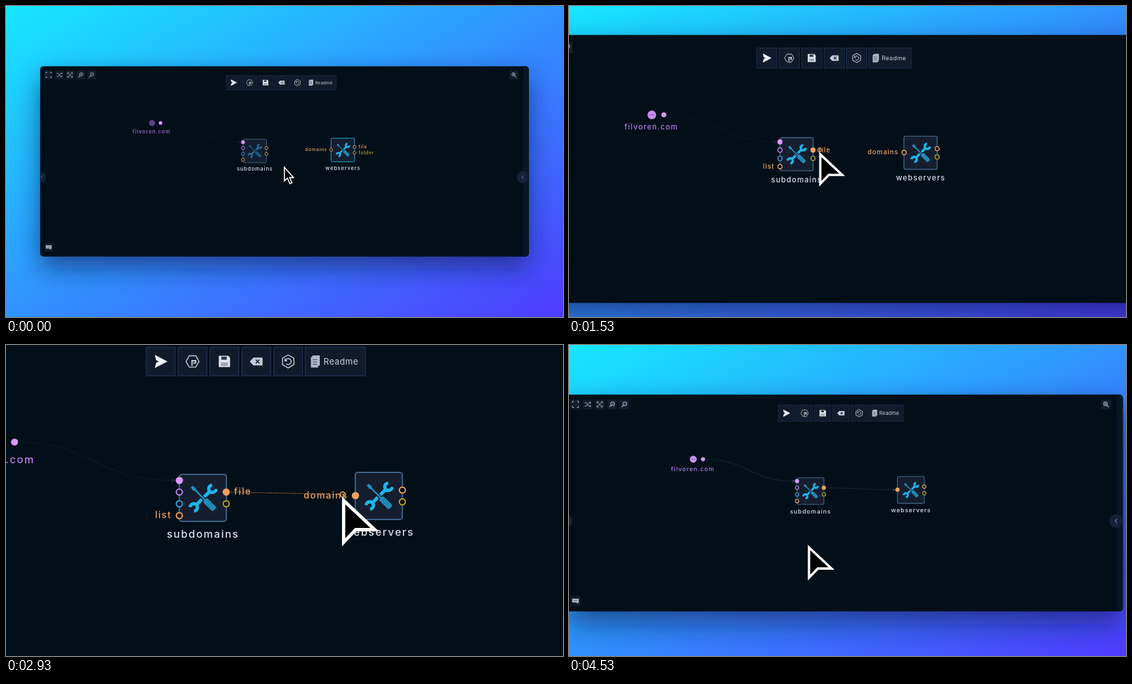
Recreate the animation shown at these times as an HTML page. Size 852 px wide and 476 px high, loop 4.59 s.

```html
<!DOCTYPE html>
<html lang="en">
<head>
<meta charset="utf-8">
<title>Workflow editor</title>
<style>
html, body { margin: 0; width: 100%; height: 100%; overflow: hidden; background: #3090ff; }
svg { display: block; width: 100%; height: 100%; }
text { font-family: Inter, "Open Sans", sans-serif; font-weight: 500; }
.name { font-size: 8px; letter-spacing: .88px; text-anchor: middle; }
.tag { font-size: 7.1px; letter-spacing: .7px; }
</style>
</head>
<body>
<svg id="stage" viewBox="0 0 852 476" preserveAspectRatio="none"></svg>
<script>
const LOOP = 4590, STEP = 1000 / 15;
const PURPLE = '#bd86f2', BLUE = '#3aa4ee', ORANGE = '#eea25f', YELLOW = '#b9a526';
const INK = '#c9d3df', PANEL = '#030f18';

const rect = (x, y, w, h, extra = '') => `<rect x="${x}" y="${y}" width="${w}" height="${h}" ${extra}/>`;
const disc = (x, y, r, extra = '') => `<circle cx="${x}" cy="${y}" r="${r}" ${extra}/>`;
const path = (d, extra = '') => `<path d="${d}" ${extra}/>`;
const line = (d, w = .8, color = INK) => path(d, `fill="none" stroke="${color}" stroke-width="${w}"`);
const at = (x, y, body, extra = '') => `<g transform="translate(${x} ${y})" ${extra}>${body}</g>`;
const group = (id, body) => `<g id="${id}">${body}</g>`;

const port = (x, y, color, id = '') =>
  disc(x, y, 2.3, `${id && `id="${id}"`} fill="${PANEL}" stroke="${color}" stroke-width="1"`);
const tagLeft = (x, y, s, color) =>
  `<text class="tag" x="${x - 5.9}" y="${y + 2.2}" text-anchor="end" fill="${color}">${s}</text>`;
const tagRight = (x, y, s, color) =>
  `<text class="tag" x="${x + 6}" y="${y + 2.2}" fill="${color}">${s}</text>`;
const name = (x, y, s, extra = 'fill="#d9e2ec"') => `<text class="name" x="${x + .4}" y="${y}" ${extra}>${s}</text>`;

// Wrench from lower left to upper right, screwdriver across it
function tools(x, y) {
  const head = path('M11.9 -2.1A2.8 2.8 0 1 0 11.9 2.1', 'fill="none" stroke="#1fb4ec" stroke-width="2.6"');
  const wrench = rect(-7.5, -1.3, 15, 2.6, 'fill="#1fb4ec"') + head + `<g transform="rotate(180)">${head}</g>`;
  const driver = 'M-12.4 -.9L-9.2 -1.4L-8.2 -.6H2V-1.7L3 -2.2H11Q12.4 -2.2 12.4 -1V1Q12.4 2.2 11 2.2H3L2 1.7V.6H-8.2L-9.2 1.4L-12.4 .9Z';
  return at(x, y, `<g transform="rotate(-45)">${wrench}</g><g transform="rotate(45)">` +
    path(driver, 'fill="#2191bd" stroke="#141e2e" stroke-width="1.6" paint-order="stroke"') +
    line('M4.5 -.8H11M4.5 .9H11', .4, '#15607f') + '</g>');
}

function node(id, x, y) {
  return rect(x, y, 36, 36, `id="${id}Box" rx="2" fill="#141e2e" stroke-width="1"`) +
    group(id + 'Icon', tools(x + 18.2, y + 18.1));
}

const curve = (x1, y1, x2, y2) => {
  const m = (x1 + x2) / 2;
  return `M${x1} ${y1}C${m} ${y1} ${m} ${y2} ${x2} ${y2}`;
};
const wire = (x1, y1, x2, y2) => line(curve(x1, y1, x2 - 4, y2), .9, '#16243a') +
  path(`M${x2 - 6} ${y2 - 1.8}L${x2 - 2.4} ${y2}L${x2 - 6} ${y2 + 1.8}Z`, 'fill="#3a4a66"');

const hex = r => 'M' + [0, 1, 2, 3, 4, 5].map(i =>
  `${(r * Math.cos(i * Math.PI / 3)).toFixed(2)} ${(r * Math.sin(i * Math.PI / 3)).toFixed(2)}`).join('L') + 'Z';

function toolbar() {
  const icons = [
    path('M-4 -4.5L4.6 0L-4 4.5L-3.2 1.2L-.8 0L-3.2 -1.2Z', 'fill="#eef3f8" stroke="#eef3f8" stroke-width=".6"'),
    line(hex(5), .7) + line('M-.4 3.4V-.6H2.4V1.2H.6', 1),
    path('M-4.3 -4.3H2.8L4.3 -2.8V4.3H-4.3Z', 'fill="#e2e8f0"') +
      rect(-2.4, -3.7, 4.2, 2.4, 'fill="#2a374a"') + rect(-2.8, .6, 5.6, 2.9, 'fill="#9aa6b6"'),
    path('M-5 0L-2.2 -3H4.8V3H-2.2Z', 'fill="#c3ccd8"') + line('M-.4 -1.4L2.4 1.4M2.4 -1.4L-.4 1.4', .9, '#1b283a'),
    `<g transform="rotate(30)">${line(hex(5), .7)}</g>` + line('M-2.2 -.7A2.3 2.3 0 1 1 -1.4 1.9M-2.4 -2.2V-.5H-.8', .7)
  ];
  const skin = 'fill="#101b2b" stroke="#1d2d4d" stroke-width=".8"';
  return icons.map((ic, i) => {
    const x = 337.2 + 24.4 * i;
    return rect(x, 106.4, 22, 21.8, skin) + at(x + 11, 117.3, ic);
  }).join('') + rect(458.9, 106.4, 46, 21.8, skin) +
    at(466.6, 117.3, path('M-1.8 -4.6H3.4V3.2H2.2V4.6H-3.4V-3Z', 'fill="#aeb9c7"') +
      line('M-2 -1.4H1.4M-2 .4H1.4M-2 2.2H1.4', .5, '#35445a')) +
    `<text x="472.9" y="119.7" font-size="6.5" letter-spacing=".28" style="font-weight:400" fill="${INK}">Readme</text>`;
}

function smallButtons() {
  const lens = line('M-1 1L-3.4 3.6', 1.1) + disc(.8, -.9, 2.5, `fill="none" stroke="${INK}" stroke-width=".9"`);
  const icons = [
    [65.3, 105.5, line('M-4 -2V-4H-2M2 -4H4V-2M4 2V4H2M-2 4H-4V2', .9)],
    [81.7, 105.5, line('M-4 -2.3H-2L1.6 2.3H4M-4 2.3H-2L1.6 -2.3H4M2.7 -3.6L4 -2.3L2.7 -1M2.7 1L4 2.3L2.7 3.6', .8)],
    [97.9, 105.5, line('M-3 -3L3 3M3 -3L-3 3', .8) + line('M-3.6 -1.4V-3.6H-1.4M1.4 -3.6H3.6V-1.4M3.6 1.4V3.6H1.4M-1.4 3.6H-3.6V1.4', .8)],
    [114.3, 105.5, lens + line('M-.4 -.9H2M.8 -2.1V.3', .6)],
    [130.7, 105.5, lens + line('M-.4 -.9H2', .6)],
    [777, 105.5, `<g transform="scale(-1 1)">${lens}</g>` + disc(-.8, -.9, 1.2, `fill="${INK}"`)],
    [65.3, 369.3, path('M-4.4 -3H4.4V2H3.4V4L1 2H-4.4Z', 'fill="#d3dbe5"') + line('M-2.6 -.5H2.6', .8, '#4a586c')]
  ];
  return icons.map(([x, y, ic]) =>
    at(x, y, rect(-6.5, -6.5, 13, 13, 'fill="#121d2d"') + `<g opacity=".8">${ic}</g>`)).join('');
}

function sideTabs() {
  return rect(791, 92, 9, 292, 'fill="#071727"') +
    disc(52, 262, 9, 'fill="#14213a"') + line('M53 259.8L55.2 262L53 264.2', .8, '#5f6f88') +
    disc(790.5, 262, 9.2, 'fill="#14213a"') + line('M791.8 259.4L789.2 262L791.8 264.6', .9, '#8291a6');
}

function source() {
  return disc(223.3, 179.1, 4.7, 'id="srcDisc"') +
    group('srcDots', [-2, 0, 2].map(d => disc(223.3 + d, 179.1, .6, 'fill="#6d3f98"')).join('')) +
    disc(236.4, 179, 2.7, 'fill="#d898fb"') + name(222.3, 195.1, 'filvoren.com', 'id="srcName"');
}

const arrow = 'M1.6 3.8L31.7 32H13.3L1.6 44.2Z';
const pointer = 'M.8 1.8V22.6L5.4 18.5L9.2 27L12.4 25.6L8.8 17.6H14.8Z';
const hand = 'M-1.4 1Q.2 -.8 1.7 1L3.4 8Q5 6.6 6.2 8Q8 6.9 9 8.8Q11.4 8.2 12 10.4L12.6 15.4Q12.6 18 11.4 20V22.6H2V20.6L-4.4 14Q-5.4 11.6 -3.2 11.8L.4 13.6Z';

document.getElementById('stage').innerHTML = `
<defs>
  <linearGradient id="sky" x1="0" y1="0" x2="1" y2="1">
    <stop offset="0" stop-color="#16e8ff"/><stop offset=".5" stop-color="#3192ff"/><stop offset="1" stop-color="#4f3bff"/>
  </linearGradient>
  <filter id="soft" x="-15%" y="-35%" width="130%" height="170%"><feGaussianBlur stdDeviation="19"/></filter>
  <clipPath id="frame">${rect(52.3, 92.2, 747.4, 291.2, 'rx="5"')}</clipPath>
</defs>
${rect(0, 0, 852, 476, 'fill="url(#sky)"')}
<g id="camera">
  ${rect(52.5, 109, 747, 291, 'rx="8" fill="#0a1a55" opacity=".62" filter="url(#soft)"')}
  <g clip-path="url(#frame)">
    ${rect(52, 92, 748, 292, `fill="${PANEL}"`)}
    ${sideTabs()}${smallButtons()}${toolbar()}
    ${group('wireA', wire(236.4, 179, 362.5, 208.4))}
    ${group('wireB', wire(398.4, 217.3, 497.3, 220))}
    ${source()}
    ${node('sub', 362.5, 203.8)}${node('web', 497.2, 202.3)}
    ${name(380.2, 252.3, 'subdomains')}${name(515, 250.6, 'webservers')}
    ${disc(362.5, 208.4, 2.8, 'fill="#d898fb"')}
    ${port(362.5, 217.3, PURPLE)}${port(362.5, 226.3, BLUE)}${port(362.5, 235.3, ORANGE)}
    ${port(398.4, 217.3, ORANGE, 'outPort')}${port(398.4, 226.3, YELLOW)}
    ${port(497.3, 220, ORANGE, 'inPort')}${port(533.2, 215.8, ORANGE)}${port(533.2, 224.8, YELLOW)}
    ${group('subTags', tagLeft(362.5, 208.4, 'domain', PURPLE) + tagLeft(362.5, 217.3, 'threads', PURPLE) +
      tagLeft(362.5, 226.3, 'json', BLUE) + tagRight(398.4, 226.3, 'folder', YELLOW))}
    ${group('matchTags', tagLeft(362.5, 235.3, 'list', ORANGE) + tagRight(398.4, 217.3, 'file', ORANGE))}
    ${group('inTag', tagLeft(497.3, 220, 'domains', ORANGE))}
    ${group('outTags', tagRight(533.2, 215.8, 'file', ORANGE) + tagRight(533.2, 224.8, 'folder', YELLOW))}
    ${group('drag', `<path id="thread" fill="none" stroke="#b97c46" stroke-width=".55" stroke-dasharray=".8 .6"/>` +
      disc(0, 0, 1.9, `id="knob" fill="none" stroke="${ORANGE}" stroke-width=".8"`))}
  </g>
  <g id="cursor">
    ${path(pointer, 'id="pointer" fill="#000" stroke="#fff" stroke-width="1.6"')}
    ${group('hand', path(hand, 'fill="#fff" stroke="#0a0f16" stroke-width="1" stroke-linejoin="round"') +
      line('M3.6 8V12.4M6.4 8.4V12.4M9.2 9.2V12.6M4 16V20M6.8 16V20M9.4 16V20', .8, '#10161e'))}
    ${path(arrow, 'id="arrow" fill="#000" stroke="#fff" stroke-width="3.2"')}
  </g>
</g>`;

const el = id => document.getElementById(id);
const set = (id, key, value) => el(id).setAttribute(key, value);
const show = (id, on) => set(id, 'display', on ? 'inline' : 'none');
const clamp = v => Math.max(0, Math.min(1, v));
const ramp = (t, a, b) => clamp((t - a) / (b - a));
const smooth = u => u * u * (3 - 2 * u);
const mix = (a, b, u) => a + (b - a) * u;
const rest = x => (1 + x) * Math.exp(-x);   // critically damped spring

const HOVER = 730, PRESS = 1300, RELEASE = 3320, ZOOM_IN = 1275, ZOOM_OUT = 3970;

function zoom(t) {
  if (t < ZOOM_IN) return 1;
  if (t < ZOOM_OUT) return 2 - rest((t - ZOOM_IN) * .00542);
  return 1 + rest((t - ZOOM_OUT) * .00614);
}

function cursorAt(t) {
  const a = smooth(ramp(t, 300, 930)), b = smooth(ramp(t, 1412, 2717));
  const c = Math.pow(ramp(t, 3900, LOOP), 2.2);
  return [425 - 22 * a + 84 * b - 132.8 * c, 245 - 26 * a + 1.8 * b + 88.2 * c];
}

function draw(t) {
  const s = zoom(t), [x, y] = cursorAt(t);
  const hover = t >= HOVER && t < PRESS, dragging = t >= PRESS && t < RELEASE;
  const early = t < PRESS, linked = t >= RELEASE;

  set('camera', 'transform', `translate(${460 * (1 - s)} ${209.5 * (1 - s)}) scale(${s})`);

  const size = early ? 1 : mix(.79, 1, smooth(ramp(t, RELEASE, RELEASE + 220)));
  set('cursor', 'transform', `translate(${x} ${y}) scale(${size})`);
  show('pointer', t < HOVER);
  show('hand', hover);
  show('arrow', !early);

  set('subBox', 'stroke', hover ? '#2ba3d6' : '#3c6488');
  set('webBox', 'stroke', early ? '#2ba3d6' : '#3c6488');
  set('subIcon', 'opacity', t < HOVER ? .55 : 1);
  set('srcDisc', 'fill', early ? '#5f3f88' : '#c88df2');
  set('srcName', 'fill', early ? '#a070d6' : '#b67ce9');
  show('srcDots', !early);

  show('subTags', hover);
  show('matchTags', hover || dragging);
  show('inTag', early || dragging);
  show('outTags', early);

  set('wireA', 'opacity', linked ? 1 : .3);
  show('wireB', linked);
  set('outPort', 'fill', early ? PANEL : ORANGE);
  set('inPort', 'fill', linked || x > 462 ? ORANGE : PANEL);

  show('drag', dragging && x > 404);
  const kx = x + .5, ky = y - 1.7;
  set('thread', 'd', `M400.5 217.3L${kx} ${ky}`);
  set('knob', 'cx', kx);
  set('knob', 'cy', ky);
}

const start = performance.now();
function tick() {
  const t = (performance.now() - start) % LOOP;
  draw(Math.floor((t + 5) / STEP) % 69 * STEP);
  requestAnimationFrame(tick);
}
tick();
</script>
</body>
</html>
```
